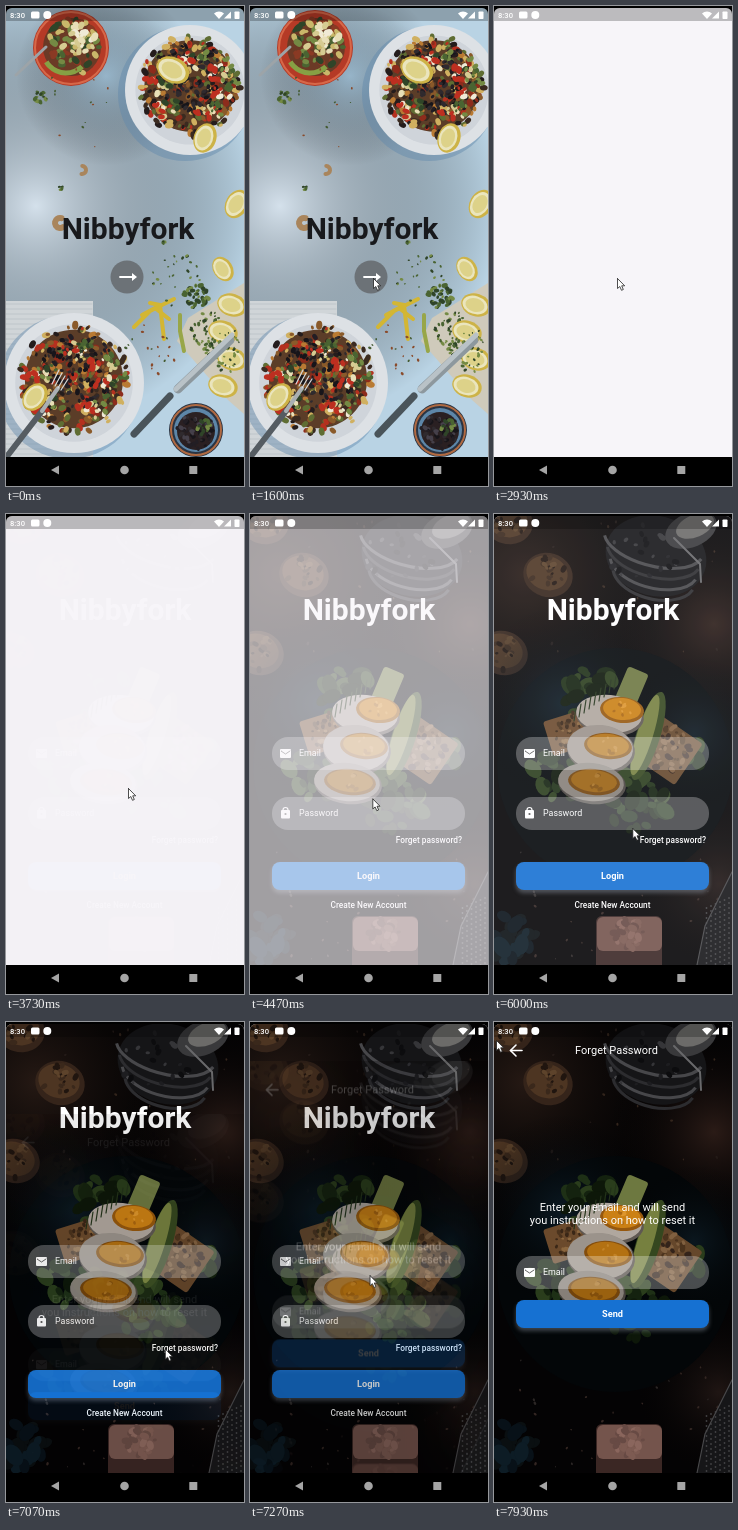
These frames come from a looping animation (238x480 px, 8000 ms). An HTML page with a canvas:

```html
<!DOCTYPE html>
<html lang="en">
<head>
<meta charset="utf-8">
<title>Food app</title>
<style>
html, body { margin: 0; width: 100%; height: 100%; overflow: hidden; background: #000; }
canvas { display: block; width: 238px; height: 480px; }
</style>
</head>
<body>
<canvas id="stage"></canvas>
<script>
const W = 238, H = 480, TOP = 2, FLOOR = 451, LOOP = 8000, TAU = Math.PI * 2;
const dpr = window.devicePixelRatio || 1;
let c, seed;

function open(canvas) {
  canvas.width = W * dpr;
  canvas.height = H * dpr;
  const ctx = canvas.getContext('2d');
  ctx.scale(dpr, dpr);
  return ctx;
}

function layer(paint) {
  const canvas = document.createElement('canvas');
  c = open(canvas);
  seed = 7;
  paint();
  return canvas;
}

const rnd = () => (seed = (seed * 16807) % 2147483647) / 2147483647;
const pick = list => list[Math.floor(rnd() * list.length)];
const clamp = v => Math.min(1, Math.max(0, v));
const mix = (a, b, k) => a + (b - a) * k;

function oval(x, y, rx, ry, rot, fill) {
  c.fillStyle = fill;
  c.beginPath();
  c.ellipse(x, y, rx, ry, rot, 0, TAU);
  c.fill();
}
const disc = (x, y, r, fill) => oval(x, y, r, r, 0, fill);

function trace(pts) {
  c.beginPath();
  for (let i = 0; i < pts.length; i += 2) c.lineTo(pts[i], pts[i + 1]);
}
function poly(fill, ...pts) {
  trace(pts);
  c.fillStyle = fill;
  c.fill();
}
function line(color, width, ...pts) {
  trace(pts);
  c.strokeStyle = color;
  c.lineWidth = width;
  c.lineCap = c.lineJoin = 'round';
  c.stroke();
}
function arc(color, width, x, y, r, a = 0, b = TAU) {
  c.beginPath();
  c.arc(x, y, r, a, b);
  c.strokeStyle = color;
  c.lineWidth = width;
  c.stroke();
}
function box(x, y, w, h, r, fill) {
  c.fillStyle = fill;
  c.beginPath();
  c.roundRect(x, y, w, h, r);
  c.fill();
}
function slab(x, y, w, h, rot, fill) {
  c.save();
  c.translate(x, y);
  c.rotate(rot);
  box(-w / 2, -h / 2, w, h, 3, fill);
  c.restore();
}
function glow(x, y, r, color) {
  const g = c.createRadialGradient(x, y, 0, x, y, r);
  g.addColorStop(0, color);
  g.addColorStop(1, 'transparent');
  c.fillStyle = g;
  c.fillRect(0, 0, W, H);
}
function label(str, x, y, size, weight = 400, align = 'center', color = '#fff') {
  c.font = `${weight} ${size}px Roboto, sans-serif`;
  c.textAlign = align;
  c.fillStyle = color;
  c.fillText(str, x, y);
}

// Bits of size up to s, spread over a disc
function scatter(x, y, r, n, s, colors) {
  for (let i = 0; i < n; i++) {
    const a = rnd() * TAU, d = Math.sqrt(rnd()) * r, k = s * mix(0.4, 1, rnd());
    oval(x + Math.cos(a) * d, y + Math.sin(a) * d, k, k * 0.7, a * 3, pick(colors));
  }
}

const GREEN = ['#2f4428', '#4a6432', '#748a44'];
const BEAN = ['#17151a', '#221e24', '#2f2a2e'];
const CREAM = ['#e8dfb8', '#d6cb92', '#f0ead6'];
const SALAD = ['#b5301f', '#8d2c1c', '#b97a33', '#8a5a2a', '#5f6d33', '#3a2a20', '#d0b060', '#241c1c'];

function lemon(x, y, r, rot) {
  oval(x, y, r, r * 0.75, rot, '#cdb347');
  oval(x - 1, y, r * 0.85, r * 0.6, rot, '#eae5bd');
  oval(x - 1, y, r * 0.65, r * 0.45, rot, '#ddd289');
}

function plate(x, y, r) {
  disc(x - 5, y + 4, r + 2, 'rgba(95,135,170,.45)');
  disc(x, y, r, '#dde1e5');
  disc(x, y, r * 0.84, '#cfd4da');
  const f = r * 0.78;
  disc(x, y - 4, f * 0.9, '#5b3d28');
  scatter(x, y - 4, f, 260, 4.5, SALAD);
  scatter(x + 4, y - 12, f * 0.7, 110, 3.4, BEAN);
  for (let i = 0; i < 6; i++) {
    const a = i * 2.4, px = x + Math.cos(a) * f * 0.65, py = y + Math.sin(a) * f * 0.6;
    scatter(px, py, 10, 7, 4, CREAM);
    scatter(px + 8, py - 6, 9, 8, 4, GREEN);
    scatter(px - 8, py, 8, 5, 4.5, ['#bd2f20']);
  }
}

function splashPhoto() {
  c.fillStyle = '#b9d3e4';
  c.fillRect(0, 0, W, H);
  glow(30, 200, 220, 'rgba(215,226,236,.9)');
  glow(100, 70, 90, 'rgba(150,190,218,.5)');

  // red bowl and spoon
  disc(65, 42, 38, '#b53a26');
  arc('#d76849', 2, 65, 42, 36);
  disc(66, 41, 29, '#6b3a26');
  scatter(66, 41, 28, 80, 5, GREEN.concat('#c9b76a', '#8a3a24'));
  scatter(73, 37, 18, 28, 5, CREAM);
  arc('#86a044', 5, 60, 44, 23, 0.8, 2.6);
  line('#9da4a8', 3, 10, 69, 40, 41);

  plate(184, 84, 65);
  lemon(167, 64, 17, 0.5);
  lemon(199, 132, 15, 1.9);

  // napkin, lower plate, fork
  box(0, 295, 87, 156, 0, '#d0d5d8');
  for (let y = 298; y < FLOOR; y += 5) line('rgba(150,158,165,.3)', 1, 0, y, 86, y);
  plate(68, 377, 70);
  lemon(29, 391, 15, 2.2);
  line('#555c62', 6, 2, 449, 36, 405);
  line('#a9afb2', 4, 36, 405, 52, 382);
  for (let i = 0; i < 4; i++) line('#d6d9da', 1.2, 46 + i * 3, 378 + i * 2, 53 + i * 3, 364 + i * 3);

  // board, knife, sauce bowl
  poly('#cfcabb', 171, 335, 182, 312, 238, 277, 238, 408, 222, 394);
  scatter(205, 325, 20, 60, 2.4, GREEN);
  for (let i = 0; i < 4; i++) lemon(226 - i % 2 * 9, 299 + i * 27, 15, 0.3);
  scatter(222, 345, 22, 50, 2.2, GREEN);
  line('#8d989e', 9, 172, 383, 224, 334);
  line('#b9c2c7', 5, 170, 383, 226, 329);
  line('#4a545a', 7, 128, 428, 164, 390);
  disc(190, 424, 27, '#2b3442');
  arc('#b06a42', 2, 190, 424, 25);
  disc(190, 424, 22, '#5d86a8');
  disc(190, 425, 19, '#2a2022');
  scatter(190, 425, 18, 60, 3.2, BEAN.concat('#45404a'));
  scatter(197, 420, 8, 14, 3, GREEN);

  // peppers, lemons, herbs, nuts
  for (let i = 0; i < 3; i++) line('#d3b633', 4, 128 + i * 8, 321 - i * 12, 144 + i * 5, 305 - i * 3, 168 - i * 5, 293 + i * 20);
  line('#98a648', 4, 174, 309, 174, 325, 178, 345);
  lemon(217, 263, 13, 1);
  lemon(231, 198, 15, 2.1);
  scatter(190, 290, 12, 34, 3.5, GREEN);
  scatter(172, 275, 27, 26, 2, GREEN);
  scatter(34, 91, 6, 14, 3, GREEN);
  scatter(70, 100, 45, 14, 1.6, ['#8a4a2a', '#445b32']);
  scatter(147, 345, 28, 18, 2, ['#8a4a2a', '#445b32']);
  scatter(55, 183, 3, 5, 2.5, GREEN);
  scatter(158, 237, 3, 5, 2.5, GREEN);
  arc('#a9855c', 4, 76, 164, 4, -1.5, 1.7);
  arc('#a9855c', 6, 54, 217, 5, 1, 5);
}

function darkPhoto() {
  c.fillStyle = '#040304';
  c.fillRect(0, 0, W, H);
  glow(30, 60, 170, 'rgba(48,32,25,.75)');
  glow(220, 110, 110, 'rgba(52,33,27,.8)');
  glow(225, 370, 90, 'rgba(38,26,23,.8)');
  scatter(119, 100, 125, 35, 2, ['#33251c', '#231a17']);
  scatter(119, 410, 120, 50, 1.8, ['#2b2625', '#332622']);

  // cookies
  for (let i = 0; i < 3; i++) {
    const x = [54, 9, 14][i], y = [61, 139, 8][i];
    oval(x, y, 25, 22, 0.3, '#35241a');
    oval(x - 1, y - 2, 21, 17, 0.3, '#4d3522');
    scatter(x, y, 18, 18, 4, ['#20150f', '#3a281b', '#5d432b']);
  }

  // glass jar
  oval(162, 42, 51, 40, 0.25, '#151517');
  for (let i = 0; i < 4; i++) {
    c.beginPath();
    c.ellipse(160, 28 + i * 11, 51 - i * 3, 24, 0.25, 0.2, 2.9);
    c.strokeStyle = i % 2 ? '#2c2c2f' : '#47474a';
    c.lineWidth = 3;
    c.stroke();
  }
  scatter(150, 45, 35, 22, 4, ['#353538', '#1d1d20', '#0c0c0e']);
  oval(197, 16, 27, 17, -0.4, '#39393b');
  oval(201, 12, 20, 11, -0.4, '#6c6b69');
  line('#68686a', 2, 180, 24, 206, 50, 207, 68);

  // plate and greens
  disc(121, 252, 118, '#030608');
  glow(70, 190, 100, 'rgba(14,32,44,.75)');
  glow(200, 220, 80, 'rgba(14,30,40,.7)');
  const leaf = ['#14220f', '#1e3016', '#0d1709', '#2a3d1c'];
  scatter(100, 180, 28, 26, 11, leaf);
  scatter(62, 262, 26, 20, 11, leaf);
  scatter(143, 290, 32, 28, 11, leaf);
  scatter(190, 240, 20, 14, 11, leaf);

  // toast and avocado
  slab(80, 217, 54, 36, -0.3, '#6b4a2c');
  slab(172, 235, 55, 50, 0.6, '#65472b');
  scatter(80, 217, 20, 45, 3, ['#4b331d', '#8b673f', '#3a2717']);
  scatter(172, 235, 24, 55, 4, ['#4b331d', '#806040', '#33231a']);
  slab(138, 172, 22, 34, 0.4, '#6d7840');
  oval(154, 222, 12, 46, 0.3, '#35471f');
  oval(151, 221, 8, 42, 0.3, '#76803f');

  // eggs, stacked down to the left
  for (let i = 0; i < 3; i++) {
    const x = 116 - i * 9, y = 200 + i * 34, ry = i === 1 ? 24 : 20, dim = 1 - i * 0.12;
    const tone = (r, g, b) => `rgb(${r * dim},${g * dim},${b * dim})`;
    oval(x, y + 2, 34, ry, 0.1, tone(95, 88, 82));
    oval(x - 1, y, 33, ry - 1, 0.1, tone(176, 167, 158));
    const yx = 128 - i * 14, yy = 196 + i * 36;
    oval(yx, yy, 22 + i * 2, 13, 0.1, tone(150, 88, 14));
    oval(yx, yy - 1, 19 + i * 2, 11, 0.1, tone(203, 128, 20));
    scatter(yx, yy, 10, 8, 3, [tone(222, 150, 45), tone(170, 102, 16)]);
  }
  for (let i = 0; i < 9; i++) line('#23331a', 1.2, 80 + i * 5, 207 - i * 4, 82 + i * 5, 194 - i * 4);

  // salt block, grater, cloth
  scatter(18, 424, 24, 22, 13, ['#081118', '#0d1c25', '#0a0f11']);
  box(102, 402, 66, 58, 6, '#3b2724');
  box(103, 403, 65, 34, 6, '#74544c');
  scatter(135, 419, 15, 35, 5, ['#8a665d', '#674a44', '#7d5b52']);
  poly('#161618', 238, 358, 238, FLOOR, 203, FLOOR, 211, 412);
  for (let i = 0; i < 80; i++) disc(235 - i % 6 * 4.5, 384 + Math.floor(i / 6) * 5 + i % 6 * 2, 0.9, '#424244');
  line('#48484a', 1.2, 238, 358, 211, 412, 203, FLOOR);
}

// Lays a picture down with a slight blur
function soft(photo) {
  c.filter = `blur(${0.55 * dpr}px)`;
  c.drawImage(photo, 0, 0, W, H);
  c.filter = 'none';
}

function field(y, name) {
  box(22, y, 193, 33, 16, 'rgba(250,250,250,.28)');
  label(name, 49, y + 19, 8.9, 400, 'left');
  if (name === 'Email') {
    box(30, y + 12, 11, 9, 1, '#fff');
    line('#666', 1, 31, y + 14, 35.5, y + 17, 40, y + 14);
  } else {
    box(31, y + 13, 9, 8.5, 1, '#fff');
    arc('#fff', 1.2, 35.5, y + 13, 2.5, Math.PI, 0);
    disc(35.5, y + 17, 1.1, '#555');
  }
}

function button(y, name) {
  c.save();
  c.shadowColor = 'rgba(150,160,175,.4)';
  c.shadowBlur = 4 * dpr;
  c.shadowOffsetY = 3 * dpr;
  box(22, y, 193, 28, 8, '#1671d2');
  c.restore();
  label(name, 118.5, y + 17, 9.2, 700);
}

function splash(photo) {
  soft(photo);
  label('Nibbyfork', 122, 233, 30, 700, 'center', '#18191c');
  disc(121, 271, 16.5, '#6c7277');
  line('#fff', 1.8, 114, 271, 128, 271);
  poly('#fff', 126, 267, 131, 271, 126, 275);
}

function login(photo) {
  soft(photo);
  label('Nibbyfork', 119, 106, 30, 700);
  field(223, 'Email');
  field(283, 'Password');
  label('Forget password?', 212, 329, 8.3, 500, 'right');
  button(348, 'Login');
  label('Create New Account', 118.5, 394, 8.3, 500);
}

function reset(photo) {
  soft(photo);
  line('#fff', 1.6, 28, 28.5, 16.5, 28.5);
  line('#fff', 1.6, 22, 23, 16.5, 28.5, 22, 34);
  label('Forget Password', 122.5, 32, 11);
  label('Enter your email and will send', 118.5, 189, 11);
  label('you instructions on how to reset it', 118.5, 202, 11);
  field(234, 'Email');
  button(278, 'Send');
}

function statusBar() {
  c.fillStyle = 'rgba(0,0,0,.24)';
  c.fillRect(0, TOP, W, 13);
  label('8:30', 4, 11.6, 7.6, 500, 'left');
  box(25, 5.5, 8.5, 7, 1.5, '#fff');
  disc(41.3, 9, 4, '#fff');
  c.beginPath();
  c.moveTo(213, 13);
  c.arc(213, 13, 7.5, -2.3, -0.84);
  c.fill();
  poly('#fff', 218, 12.5, 225, 12.5, 225, 5.5);
  box(228.5, 5.5, 5, 7.5, 0.8, '#fff');
}

function navBar() {
  poly('#a5a5a5', 45, 464, 53, 459.5, 53, 468.5);
  disc(118.5, 464, 4.3, '#a5a5a5');
  box(183.3, 460, 8, 8, 0.5, '#a5a5a5');
}

function pointer(t) {
  const part = (a, b) => clamp((t - a) / (b - a));
  if (t >= 7930) return [2, 18];
  if (t >= 7070) return [mix(159, 2, part(7070, 7870)), mix(327, 33, part(7070, 7870))];
  if (t >= 3530) {
    const p = part(3730, 6600);
    return [122 + 37 * p ** 3.5, 274 + 53 * p ** 1.2];
  }
  return [mix(218, 123, part(930, 1600)), mix(345, 272, part(930, 1600))];
}

function cursor(t) {
  if (t < 930) return;
  const [x, y] = pointer(t);
  c.save();
  c.translate(x + 0.5, y + 0.5);
  const shape = [0, 0, 0, 10, 2.3, 8, 4, 11.8, 5.8, 11, 4.2, 7.3, 7.2, 7.3, 0, 0];
  poly('#fff', ...shape);
  line('#222', 0.8, ...shape);
  c.restore();
}

// cubic-bezier(.4, 0, .2, 1)
function swift(x) {
  let lo = 0, hi = 1;
  for (let i = 0; i < 24; i++) {
    const s = (lo + hi) / 2, q = 1 - s;
    if (1.2 * q * q * s + 0.6 * q * s * s + s ** 3 < x) lo = s; else hi = s;
  }
  return 3 * (1 - lo) * lo * lo + lo ** 3;
}

function show(page, alpha = 1, dy = 0) {
  c.globalAlpha = alpha;
  c.drawImage(page, 0, dy, W, H);
  c.globalAlpha = 1;
}

const bright = layer(splashPhoto), dark = layer(darkPhoto);
const pages = {
  splash: layer(() => splash(bright)),
  login: layer(() => login(dark)),
  reset: layer(() => reset(dark))
};
const screen = open(document.getElementById('stage'));

function draw(t) {
  c = screen;
  c.fillStyle = '#000';
  c.fillRect(0, 0, W, H);
  c.save();
  c.beginPath();
  c.roundRect(0, TOP, W, FLOOR - TOP, [6, 6, 0, 0]);
  c.clip();
  if (t < 2930) show(pages.splash);
  else {
    c.fillStyle = '#f7f5f9';
    c.fillRect(0, 0, W, H);
    if (t >= 3730) show(pages.login, 1 - (1 - clamp((t - 3700) / 2900)) ** 1.4);
    if (t >= 7070) {
      const p = clamp((t - 6841) / 1029);
      show(pages.reset, p ** 1.7, 112 * (1 - swift(p)));
    }
  }
  statusBar();
  c.restore();
  navBar();
  cursor(t);
}

const start = performance.now();
function tick() {
  draw((performance.now() - start) % LOOP);
  requestAnimationFrame(tick);
}
tick();
</script>
</body>
</html>
```
